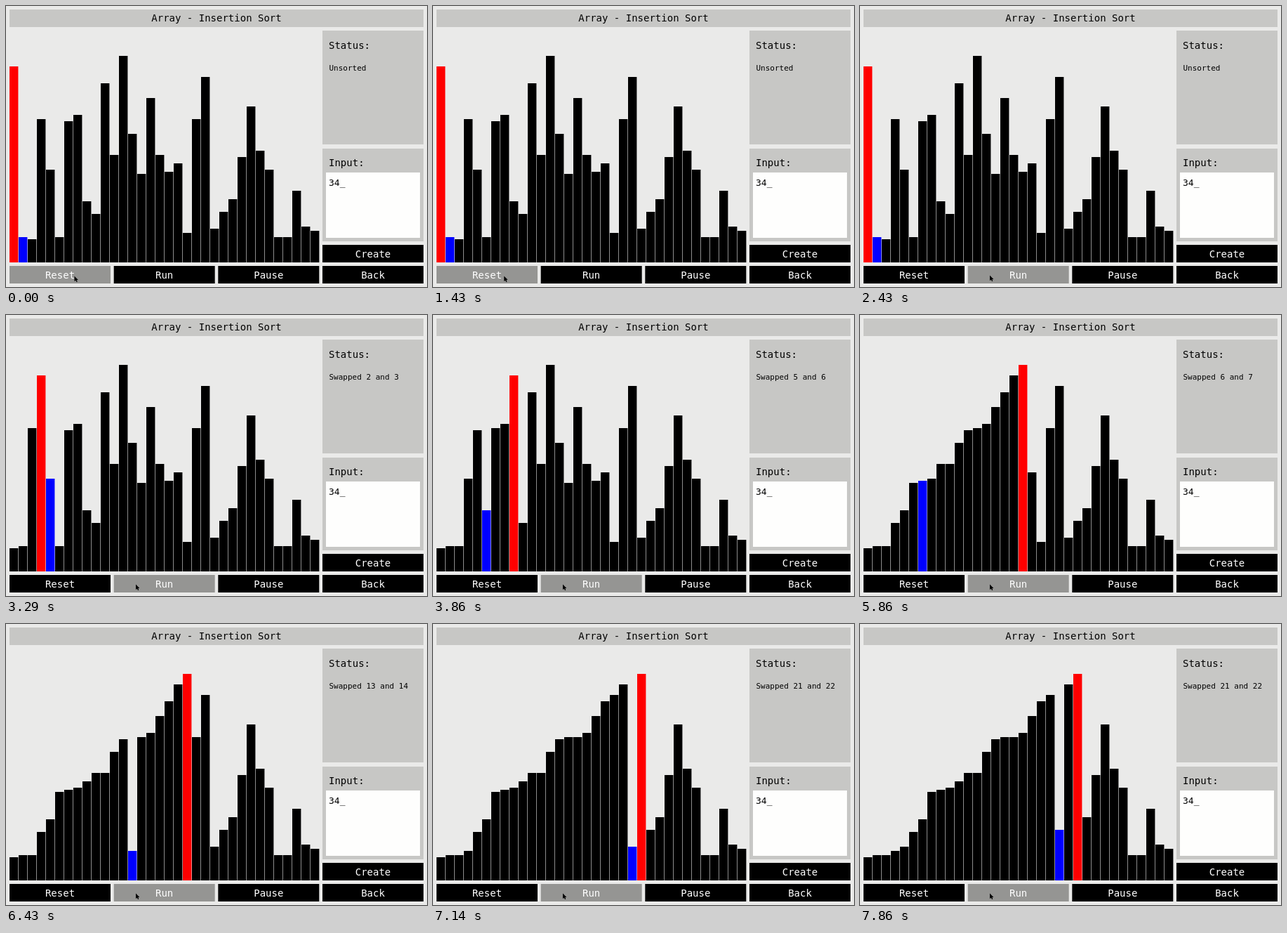
These frames come from a looping animation (600 px wide and 400 px high, 8000 ms). An HTML page:

```html
<!DOCTYPE html>
<html lang="en">
<head>
<meta charset="utf-8">
<title>Insertion Sort</title>
<style>
  html, body { margin: 0; width: 100%; height: 100%; overflow: hidden; background: #eaeae9; }
  svg { display: block; width: 600px; height: 400px; }
  text { font-family: "DejaVu Sans Mono", "Noto Sans Mono", monospace; font-size: 14px; white-space: pre; }
</style>
</head>
<body>
<svg id="stage" viewBox="0 0 600 400"></svg>
<script>
const LOOP = 8000, FPS = 7, TICKS = 15;
const BASE = 365, PITCH = 13, BAR = 12.4, UNIT = 3;
const PANEL = '#c7c7c5', HOVER = '#959593';
const VALUES = [93, 12, 11, 68, 44, 12, 67, 70, 29, 23, 85, 51, 98, 61, 42, 78, 51,
  43, 47, 14, 68, 88, 16, 24, 30, 50, 74, 53, 44, 12, 12, 34, 17, 15];

const stage = document.getElementById('stage');

function add(tag, attrs, content) {
  const el = document.createElementNS('http://www.w3.org/2000/svg', tag);
  for (const name in attrs) el.setAttribute(name, attrs[name]);
  if (content) el.textContent = content;
  return stage.appendChild(el);
}
const box = (x, y, width, height, fill) => add('rect', { x, y, width, height, fill });
const label = (x, y, content, size = 14) =>
  add('text', { x, y, style: `font-size:${size}px` }, content);

function button(x, y, content) {
  const face = box(x, y, 144, 25, '#000');
  add('text', { x: x + 72, y: y + 18, fill: '#fff', 'text-anchor': 'middle' }, content);
  return face;
}

box(0, 0, 600, 400, '#eaeae9');
box(5, 5, 590, 25, PANEL);
add('text', { x: 300, y: 22, 'text-anchor': 'middle' }, 'Array - Insertion Sort');

box(451, 35, 144, 162, PANEL);
label(460, 61, 'Status:');
const status = label(460.5, 92, 'Unsorted', 11);

box(451, 203, 144, 132, PANEL);
label(460, 228, 'Input:');
box(456, 237, 134, 93, '#fefefd');
label(460, 256, '34_', 13);

button(451, 340, 'Create');
const reset = button(5, 370, 'Reset');
const run = button(153.67, 370, 'Run');
button(302.33, 370, 'Pause');
button(451, 370, 'Back');

const bars = VALUES.map((v, i) => box(5 + PITCH * i, 0, BAR, 0, '#000'));
const cursor = add('path', { d: 'M0 0V7.5L1.8 6L3 8.6L4.3 8L3.2 5.4H5.4Z' });

// Replays the sort: every step is either one swap or a move to the next item.
function sortAfter(steps) {
  const a = VALUES.slice();
  let i = 1, j = 1, message = 'Unsorted';
  while (steps-- > 0) {
    if (j > 0 && a[j - 1] > a[j]) {
      [a[j - 1], a[j]] = [a[j], a[j - 1]];
      j--;
      message = `Swapped ${j} and ${j + 1}`;
    } else {
      j = ++i;
    }
  }
  return { a, message, blue: j, red: j === i ? i - 1 : i };
}

function drawCursor(frame) {
  const p = Math.min(1, Math.max(0, (frame - 9) / 8));
  const ease = p * p * (3 - 2 * p);
  const x = 97.5 + 87.5 * ease, y = 384.5 - ease;
  cursor.setAttribute('transform', `translate(${x} ${y})`);
  reset.setAttribute('fill', x < 149 ? HOVER : '#000');
  run.setAttribute('fill', x >= 153 ? HOVER : '#000');
}

function drawBars(frame) {
  const tick = Math.floor(frame * TICKS / FPS);
  const { a, message, red, blue } = sortAfter(Math.floor(1.98 * tick - 89.91));
  bars.forEach((bar, i) => {
    const h = a[i] * UNIT;
    bar.setAttribute('y', BASE - h);
    bar.setAttribute('height', h);
    bar.setAttribute('fill', i === red ? '#f00' : i === blue ? '#00f' : '#000');
  });
  status.textContent = message;
}

function render(ms) {
  const frame = Math.floor((ms % LOOP + 3) * FPS / 1000);
  drawCursor(frame);
  drawBars(frame);
}

const start = performance.now();
function loop() {
  render(performance.now() - start);
  requestAnimationFrame(loop);
}
loop();
</script>
</body>
</html>
```
